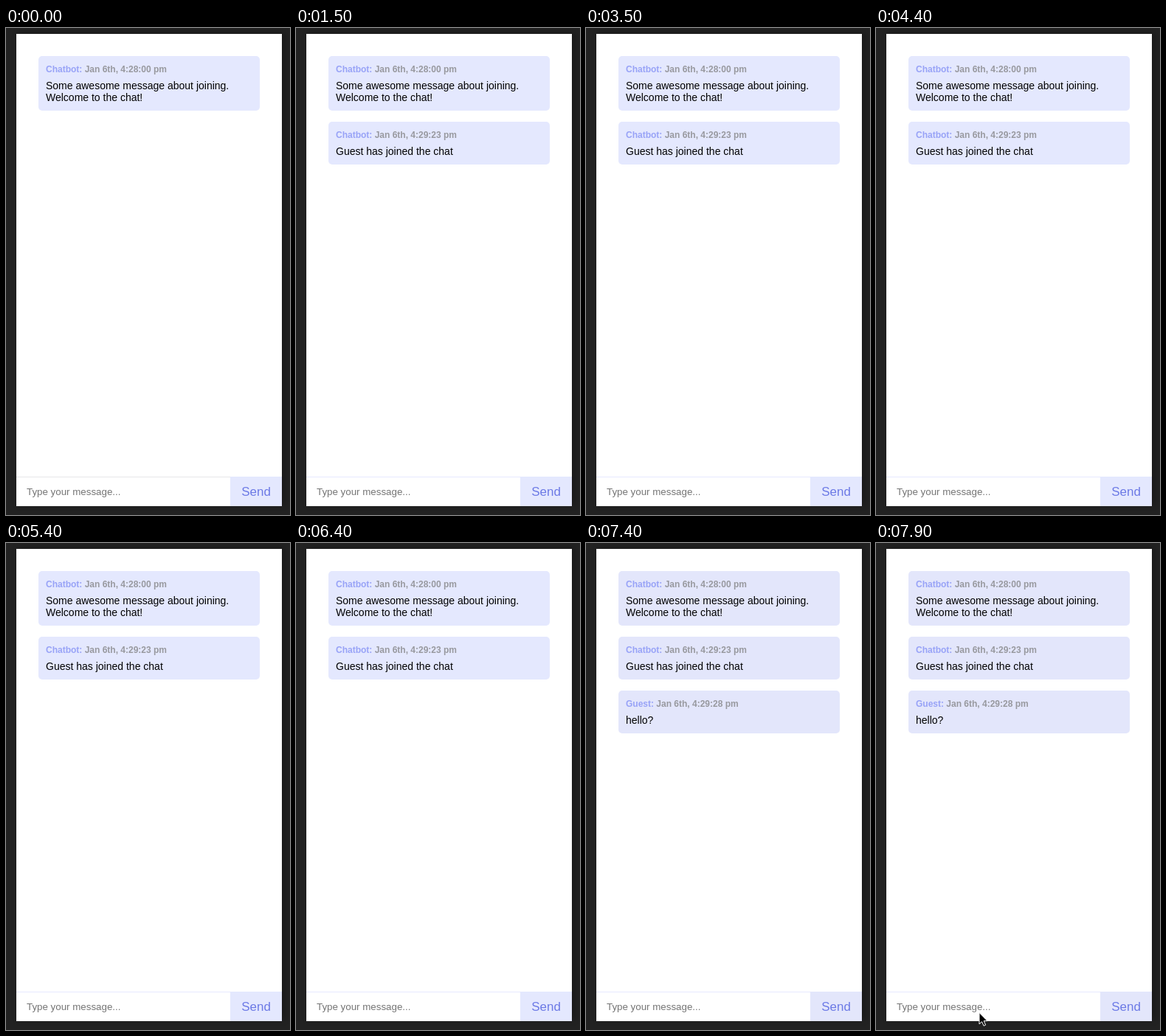
These frames come from a looping animation (385 by 660 pixels, 8000 ms). An HTML page:

```html
<!DOCTYPE html>
<html lang="en">
<head>
<meta charset="utf-8">
<title>Chat</title>
<style>
  html, body { margin: 0; width: 100%; height: 100%; overflow: hidden; background: #222; }
  svg { display: block; width: 100%; height: 100%; }
  text { font-family: "Liberation Sans", Arial, sans-serif; white-space: pre; }
  .meta { font-size: 12px; font-weight: bold; fill: #98999f; }
  .name { fill: #98a3f7; }
  .body { font-size: 14px; fill: #000; }
</style>
</head>
<body>
<svg id="stage" viewBox="0 0 385 660">
  <defs>
    <filter id="soft" x="-10%" y="-10%" width="120%" height="120%">
      <feGaussianBlur stdDeviation="4"/>
    </filter>
  </defs>
  <rect width="385" height="660" fill="#222"/>
  <rect x="16" y="6" width="362" height="640" fill="#000" opacity=".25" filter="url(#soft)"/>
  <rect x="14" y="8" width="360" height="640" fill="#fff"/>
  <g id="messages"></g>
  <rect id="line" x="14" y="608" width="290" height="1"/>
  <text x="28" y="633" font-size="13.33" fill="#757575">Type your message...</text>
  <rect id="button" x="304" y="608" width="70" height="40"/>
  <text x="339" y="634" font-size="17" fill="#6c7ae6" text-anchor="middle">Send</text>
  <path id="pointer" d="M0 0V15.5L3.6 12.2L6 17.8L8.6 16.7L6.2 11.2H11Z"
        fill="#000" stroke="#fff" stroke-width="1" stroke-linejoin="round"/>
</svg>
<script>
const LOOP = 8000, STEP = 100;
const JOIN = 1500, HELLO = 6600, POINTER_IN = 7500, POINTER_END = 7900;
const $ = id => document.getElementById(id);

const messages = [
  { at: 0, y: 38, name: "Chatbot", time: "4:28:00",
    lines: ["Some awesome message about joining.", "Welcome to the chat!"] },
  { at: JOIN, y: 127, name: "Chatbot", time: "4:29:23", lines: ["Guest has joined the chat"] },
  { at: HELLO, y: 200, name: "Guest", time: "4:29:28", lines: ["hello?"] }
];

function add(parent, tag, attrs, text = "") {
  const el = document.createElementNS("http://www.w3.org/2000/svg", tag);
  for (const key in attrs) el.setAttribute(key, attrs[key]);
  el.textContent = text;
  return parent.appendChild(el);
}

for (const m of messages) {
  m.group = add($("messages"), "g", {});
  m.box = add(m.group, "rect", { x: 44, y: m.y, width: 300, height: 42 + 16 * m.lines.length, rx: 5 });
  const meta = add(m.group, "text", { x: 54, y: m.y + 22, class: "meta" });
  add(meta, "tspan", { class: "name" }, m.name + ": ");
  add(meta, "tspan", {}, `Jan 6th, ${m.time} pm`);
  m.lines.forEach((line, i) =>
    add(m.group, "text", { x: 54, y: m.y + 45 + 16 * i, class: "body" }, line));
}

function draw(time) {
  const t = Math.floor(time % LOOP / STEP) * STEP;
  const tint = t < HELLO ? "#e4e8fe" : "#e3e6fb";
  for (const m of messages) {
    m.group.style.display = t >= m.at ? "" : "none";
    m.box.setAttribute("fill", tint);
  }
  $("button").setAttribute("fill", tint);
  $("line").setAttribute("fill", t < JOIN ? "#e6e6e8" : "#e6e8fe");

  // The pointer rises from the bottom edge and slows down.
  const p = Math.min(1, Math.max(0, (t - POINTER_IN) / (POINTER_END - POINTER_IN)));
  const rest = (1 - p) ** 2;
  $("pointer").style.display = t >= POINTER_IN ? "" : "none";
  $("pointer").setAttribute("transform", `translate(${140 + 15 * rest} ${636.5 + 20 * rest})`);
}

const start = performance.now();
function tick() {
  draw(performance.now() - start);
  requestAnimationFrame(tick);
}
tick();
</script>
</body>
</html>
```
